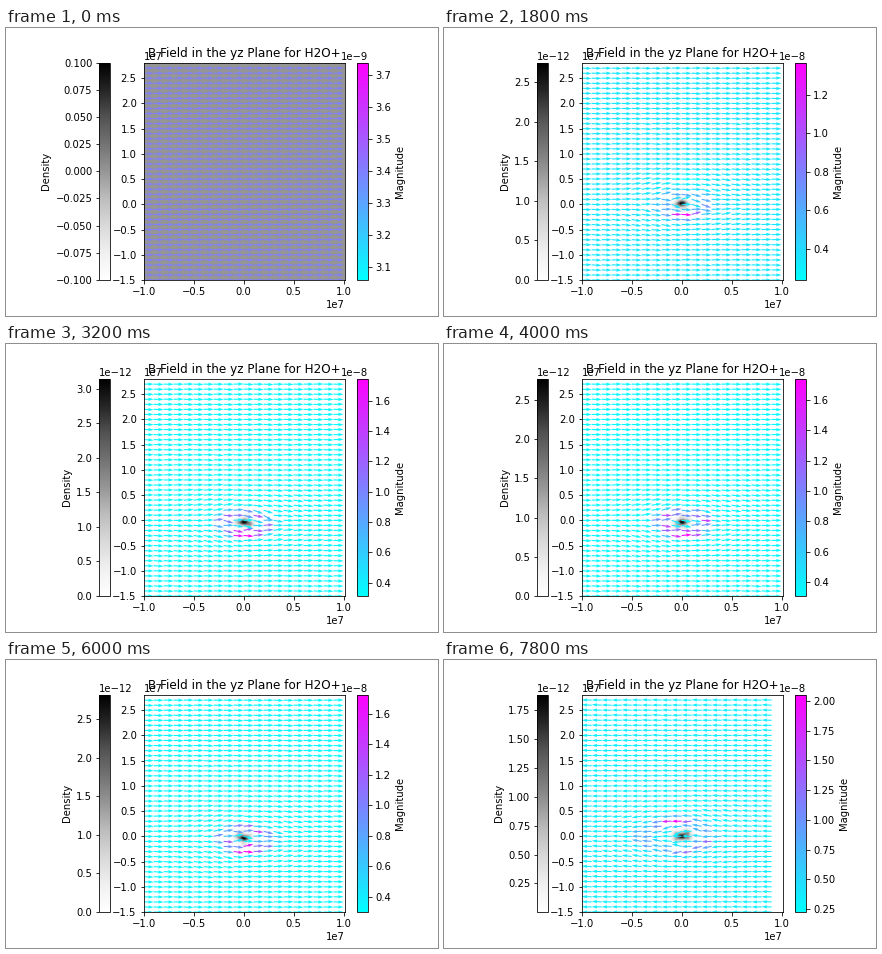
These frames come from a looping animation (432x288 px, 8000 ms). A matplotlib script:

```python
import numpy as np
import matplotlib.pyplot as plt
from matplotlib.animation import FuncAnimation

plt.rcParams.update({"font.family": "DejaVu Sans", "font.size": 10,
                     "figure.subplot.bottom": 0.125})

FRAMES, STEP = 40, 200
FLIP = 35                                  # the background field reverses here
B0 = 0.34                                  # undisturbed field, 1e-8
XLIM, YLIM = (-1e7, 1.01e7), (-1.5e7, 2.81e7)

# positions in units of 1e6
X, Y = np.meshgrid(np.arange(-10, 10), np.arange(-15, 28))
DX, DY = np.meshgrid((np.arange(84) + 0.5) / 4 - 10,
                     (np.arange(176) + 0.5) / 4 - 15)


def ease(n, start, end):
    t = np.clip((n - start) / (end - start), 0, 1)
    return t * t * (3 - 2 * t)


def bump(x, y, w, h):
    return np.exp(-(x / w) ** 2 - (y / h) ** 2)


def peak_density(n):
    return np.interp(n, [0, 6, 13, 20, 25, 30, 39],
                     [0, 2.23, 3.43, 2.77, 2.675, 2.82, 1.885])


def field_range(n):
    low = np.interp(n, [0, 6, 13, 30, 39], [0.306, 0.179, 0.313, 0.302, 0.224])
    high = np.interp(n, [0, 6, 13, 30, 39], [0.374, 1.08, 1.75, 1.725, 2.054])
    return low, high


def core_height(n):
    return 0.5 - 0.9 * ease(n, 6, 13) + 0.4 * ease(n, FLIP, FRAMES)


def density(n):
    rng = np.random.default_rng(100 + n)
    y = DY - core_height(n)
    clump = 0.15 + 0.15 * ease(n, 6, 13) + 0.3 * ease(n, FLIP, FRAMES)
    d = bump(DX, y, 0.5, 0.6)
    d += clump * np.exp(-abs(DX) / 0.6 - abs(y) / 0.8)
    for a in rng.uniform(0, 2 * np.pi, 5):
        d += clump * 0.7 * bump(DX - 0.7 * np.cos(a), y - 1.3 * np.sin(a), 0.3, 0.5)
    return peak_density(n) * 1e-12 * d / d.max()


def field(n):
    rng = np.random.default_rng(n)
    low, high = field_range(n)
    grow = min(n / 6, 1)
    side = -1 if n < FLIP else 1           # pile-up below, then above the core
    x, y = X + 0.2, Y - core_height(n)
    r = np.hypot(x / 1.1, y)

    angle = -0.5 * x * y / (4 + r ** 2) * np.exp(-r ** 2 / 45)
    angle += rng.normal(0, 0.22, X.shape) * np.exp(-(r / 3) ** 2)
    angle += rng.normal(0, 0.015, X.shape) - 0.02
    angle = grow * angle + np.pi * (n >= FLIP)

    radius = 2 + ease(n, FLIP, FRAMES)
    ring = 0.2 + 0.7 * ease(n, 6, 13)
    hot = bump(x, y - side * (radius + 0.4), 1.4, 0.7)
    hot += ring * np.exp(-((r - radius) / 0.8) ** 2) * rng.uniform(0.3, 1, X.shape)
    mag = B0 + grow * (high - B0) * hot / hot.max()
    mag -= grow * (B0 - low) * bump(x, y - radius - 3, 2, 1.2)
    return np.cos(angle), np.sin(angle), mag * 1e-8


fig, ax = plt.subplots(figsize=(6, 4), dpi=72)
image = ax.imshow(np.zeros(DX.shape), cmap="Greys", origin="lower",
                  aspect="auto", interpolation="bilinear",
                  extent=(-1e7, 1.1e7, -1.5e7, 2.9e7), vmin=-0.1, vmax=0.1)
arrows = ax.quiver(X * 1e6, Y * 1e6, *field(0), cmap="cool",
                   scale=20, width=0.0055)
arrows.set_clim(3.06e-9, 3.74e-9)
ax.set(xlim=XLIM, ylim=YLIM)
ax.set_title("B Field in the yz Plane for H2O+", y=1.0)

left = fig.colorbar(image, ax=ax, location="left", pad=0.1, label="Density")
right = fig.colorbar(arrows, ax=ax, label="Magnitude")
left.ax.yaxis.set_offset_position("left")
right.ax.yaxis.set_offset_position("right")


def update(n):
    image.set_data(density(n))
    if n == 0:
        image.set_clim(-0.1, 0.1)
    else:
        # late on, no cell is quite empty
        image.set_clim(3e-15 * (n >= FLIP), peak_density(n) * 1e-12)
    arrows.set_UVC(*field(n))
    low, high = field_range(n)
    arrows.set_clim(low * 1e-8, high * 1e-8)
    return image, arrows


anim = FuncAnimation(fig, update, frames=FRAMES, interval=STEP,
                     init_func=lambda: update(0), repeat=True, repeat_delay=0)
plt.show()
```
